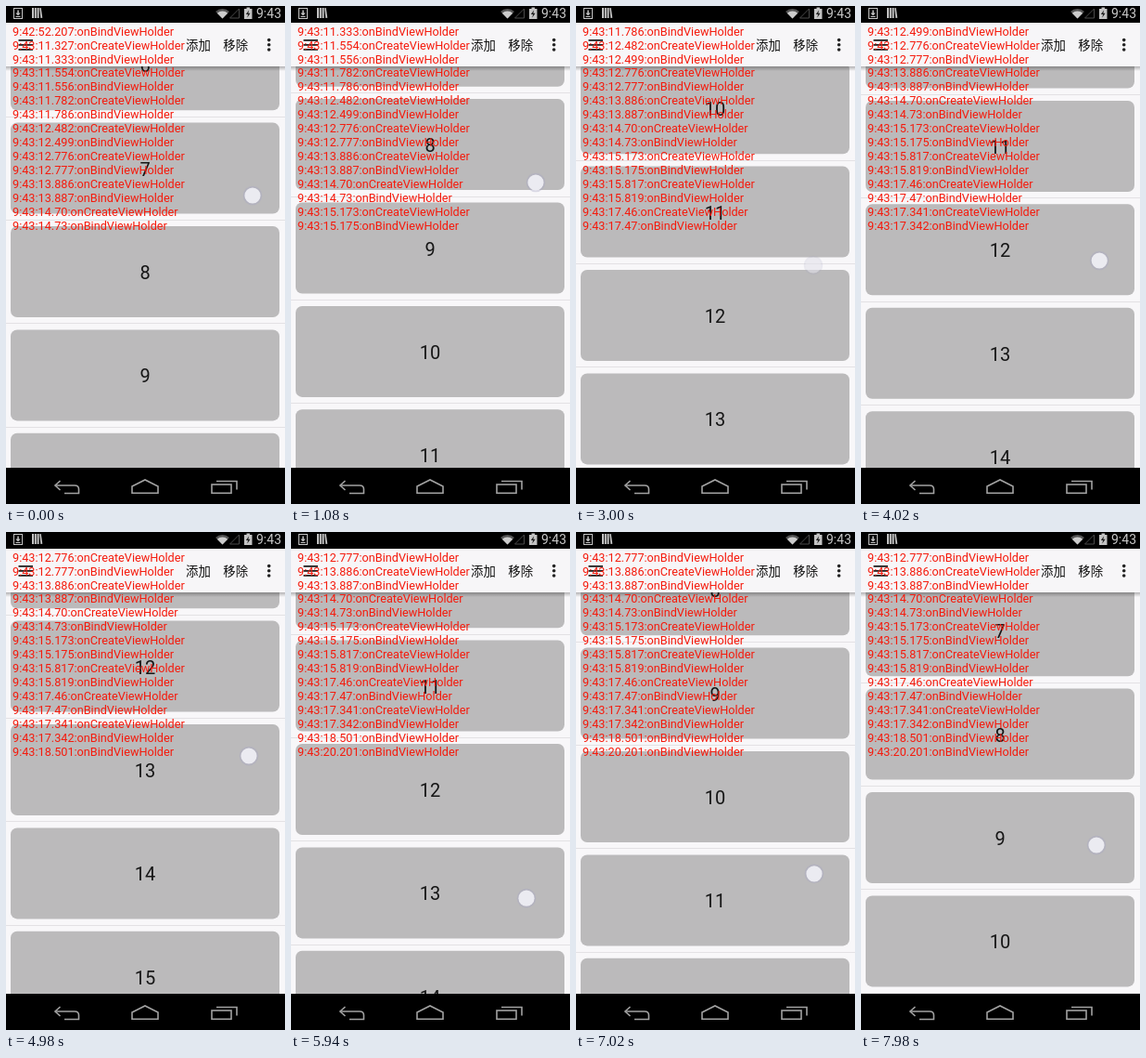
These frames come from a looping animation (301 px wide and 536 px high, 8 s). An HTML page with a canvas:

```html
<!DOCTYPE html>
<html lang="zh">
<head>
<meta charset="utf-8">
<title>List scrolling</title>
<style>
html, body { margin: 0; width: 100%; height: 100%; overflow: hidden; background: #000; }
canvas { display: block; width: 301px; height: 536px; }
</style>
</head>
<body>
<canvas id="stage"></canvas>
<script>
const W = 301, H = 536, LOOP = 8000, STEP = 60;
const PITCH = 111.4, CARD = 98, BAR = 65, NAV = 497;
const CLOCK = 14.34; // log clock, in seconds, when the loop starts

const canvas = document.getElementById('stage');
const ctx = canvas.getContext('2d');
const dpr = window.devicePixelRatio || 1;
canvas.width = W * dpr;
canvas.height = H * dpr;
ctx.scale(dpr, dpr);

// [time, scroll offset]
const scrollKeys = [
  [0, 0], [120, 28], [300, 50], [600, 62], [839, 62], [840, 69],
  [1100, 140], [1477, 181], [1700, 195], [1920, 260], [2040, 275],
  [2300, 284], [2600, 286], [2706, 292], [2900, 372], [3000, 398.6],
  [3060, 405], [3300, 423], [3700, 436], [3960, 455], [4161, 515],
  [4400, 542], [4740, 551], [4980, 587], [5100, 596], [5400, 599],
  [5640, 597], [5861, 500], [5940, 454.6], [6060, 425], [6260, 400],
  [6560, 320], [6780, 285], [6900, 262], [7020, 223.8], [7140, 190],
  [7320, 155], [7500, 130], [7560, 128], [7740, 128], [7860, 112], [7980, 68.4]
];

// [down, up, x0, y0, x1, y1]
const touches = [
  [-120, 120, 264, 222, 268, 186],
  [840, 1080, 258, 280, 264, 190],
  [1680, 1980, 257, 265, 264.5, 152.5],
  [2640, 2900, 252, 385, 256, 279],
  [3900, 4200, 254, 310, 262, 220],
  [4740, 5040, 258, 281, 263, 231],
  [5640, 6000, 262, 245, 252.4, 424],
  [6300, 6540, 260, 290, 253, 375],
  [6780, 7080, 261, 275, 256, 391],
  [7740, 8040, 258, 275, 253, 352.5]
];

// Seconds past 9:43; a "C" marks a created holder, the rest are bound
const log = ('C11.327 11.333 C11.554 11.556 C11.782 11.786 C12.482 12.499 ' +
  'C12.776 12.777 C13.886 13.887 C14.70 14.73 C15.173 15.175 C15.817 15.819 ' +
  'C17.46 17.47 C17.341 17.342 18.501 20.201').split(' ').map(entry => {
  const made = entry[0] === 'C';
  const stamp = made ? entry.slice(1) : entry;
  const [s, ms] = stamp.split('.').map(Number);
  return { at: s + ms / 1000, text: `9:43:${stamp}:on${made ? 'Create' : 'Bind'}ViewHolder` };
});
log.unshift({ at: 0, text: '9:42:52.207:onBindViewHolder' });

// Monotone cubic interpolation
function sample(keys, t) {
  const last = keys.length - 1;
  if (t >= keys[last][0]) return keys[last][1];
  let i = 0;
  while (t >= keys[i + 1][0]) i++;
  const slope = k => (keys[k + 1][1] - keys[k][1]) / (keys[k + 1][0] - keys[k][0]);
  const tangent = k => {
    if (k === 0) return slope(0);
    if (k === last) return slope(last - 1);
    const a = slope(k - 1), b = slope(k);
    return a * b <= 0 ? 0 : 2 * a * b / (a + b);
  };
  const h = keys[i + 1][0] - keys[i][0], u = (t - keys[i][0]) / h;
  const v = 1 - u;
  return v * v * (1 + 2 * u) * keys[i][1] + u * u * (3 - 2 * u) * keys[i + 1][1] +
    h * u * v * (v * tangent(i) - u * tangent(i + 1));
}

function rect(x, y, w, h, color) {
  ctx.fillStyle = color;
  ctx.fillRect(x, y, w, h);
}

function text(str, x, y, font, color, align = 'left') {
  ctx.font = font;
  ctx.fillStyle = color;
  ctx.textAlign = align;
  ctx.fillText(str, x, y);
}

function poly(points, close) {
  ctx.beginPath();
  points.forEach(([x, y]) => ctx.lineTo(x, y));
  if (close) ctx.closePath();
}

function disc(x, y, r, color) {
  ctx.beginPath();
  ctx.arc(x, y, r, 0, Math.PI * 2);
  ctx.fillStyle = color;
  ctx.fill();
}

function drawList(scroll) {
  rect(0, BAR, W, NAV - BAR, '#f8f7f9');
  for (let n = 5; n < 18; n++) {
    const y = 237 + (n - 8) * PITCH - scroll;
    if (y > NAV + 8 || y + CARD < 18) continue;
    rect(0, Math.round(y - 7), W, 1, '#e3e1e4');
    ctx.beginPath();
    ctx.roundRect(5, y, 290, CARD, 7);
    ctx.fillStyle = '#bbbabb';
    ctx.fill();
    text(n, 150, y + 57, '20px Roboto, sans-serif', '#161616', 'center');
  }
}

function drawToolbar() {
  const shade = ctx.createLinearGradient(0, BAR, 0, BAR + 5);
  shade.addColorStop(0, 'rgba(0,0,0,.28)');
  shade.addColorStop(1, 'rgba(0,0,0,0)');
  rect(0, BAR, W, 5, shade);
  rect(0, 18, W, BAR - 18, '#f7f6f8');
  for (const y of [36, 41, 46]) rect(13.5, y, 15.5, 1.8, '#222');
  const font = '13.4px "Noto Sans CJK SC", "Noto Sans CJK", sans-serif';
  text('添加', 194, 47, font, '#111');
  text('移除', 234.3, 47, font, '#111');
  for (const y of [36.6, 41.8, 47]) disc(283.7, y, 1.8, '#222');
}

function drawStatus() {
  rect(0, 0, W, 18, '#000');
  const light = '#c4c4c4';
  ctx.strokeStyle = light;
  ctx.lineWidth = 1;
  ctx.strokeRect(8.5, 2.5, 9, 11);
  rect(12.3, 4.5, 1.5, 4, light);
  ctx.fillStyle = light;
  poly([[10.3, 7.5], [15.7, 7.5], [13, 10.5]], true);
  ctx.fill();
  rect(10.5, 11, 5, 1, light);
  [28, 30.8, 33.6].forEach(x => rect(x, 2, 2, 11, light));
  poly([[36.2, 2.3], [37.8, 2], [39.3, 12.8], [37.4, 13]], true);
  ctx.fillStyle = light;
  ctx.fill();

  ctx.beginPath();
  ctx.moveTo(233.5, 13.5);
  ctx.arc(233.5, 13.5, 10.5, -Math.PI * .75, -Math.PI * .25);
  ctx.closePath();
  ctx.fillStyle = '#555';
  ctx.fill();
  ctx.beginPath();
  ctx.moveTo(233.5, 13.5);
  ctx.arc(233.5, 13.5, 8, -Math.PI * .75, -Math.PI * .25);
  ctx.closePath();
  ctx.fillStyle = '#ccc';
  ctx.fill();

  ctx.strokeStyle = '#4a4a4a';
  poly([[241.5, 13], [251.5, 13], [251.5, 3]], true);
  ctx.stroke();

  rect(257, 3, 8.5, 11, light);
  rect(259.5, 1.5, 3.5, 2, light);
  ctx.fillStyle = '#222';
  poly([[262, 4.5], [258.8, 9], [261, 9], [260.3, 12.5], [263.6, 7.8], [261.4, 7.8]], true);
  ctx.fill();
  text('9:43', 297, 13, '14px Roboto, sans-serif', '#c8c8c8', 'right');
}

function drawNav() {
  rect(0, NAV, W, H - NAV, '#000');
  ctx.strokeStyle = '#a2a2a2';
  ctx.lineWidth = 1.6;
  ctx.lineJoin = 'miter';
  poly([[58.5, 511], [53, 516], [58.5, 521]]);
  ctx.stroke();
  ctx.beginPath();
  ctx.moveTo(53, 516);
  ctx.lineTo(74, 516);
  ctx.quadraticCurveTo(78.5, 516, 78.5, 520);
  ctx.lineTo(78.5, 524.5);
  ctx.lineTo(63, 524.5);
  ctx.stroke();
  poly([[136, 517], [150, 510], [164, 517], [164, 524.3], [136, 524.3]], true);
  ctx.stroke();
  ctx.strokeRect(222, 515, 21, 9.3);
  poly([[227, 511.5], [249, 511.5], [249, 520.5]]);
  ctx.stroke();
}

function drawLog(t) {
  const shown = log.filter(line => line.at <= CLOCK + t / 1000).slice(-15);
  shown.forEach((line, i) =>
    text(line.text, 7, 31.7 + i * 14.93, '12.7px Roboto, sans-serif', '#f51a0c'));
}

function drawTouch(t) {
  for (const [down, up, x0, y0, x1, y1] of touches) {
    if (t < down || t > up + 180) continue;
    const u = Math.min(1, (t - down) / (up - down));
    const x = x0 + (x1 - x0) * u, y = y0 + (y1 - y0) * u;
    ctx.globalAlpha = t > up ? 1 - (t - up) / 200 : 1;
    disc(x, y, 10.3, 'rgba(165,165,195,.38)');
    disc(x, y, 8.6, 'rgba(238,238,243,.95)');
    ctx.globalAlpha = 1;
  }
}

function draw(t) {
  drawList(sample(scrollKeys, t));
  drawToolbar();
  drawLog(t);
  drawStatus();
  drawNav();
  drawTouch(t);
}

const start = performance.now();
function tick() {
  const t = (performance.now() - start) % LOOP;
  draw(Math.floor(t / STEP) * STEP);
  requestAnimationFrame(tick);
}
tick();
</script>
</body>
</html>
```
